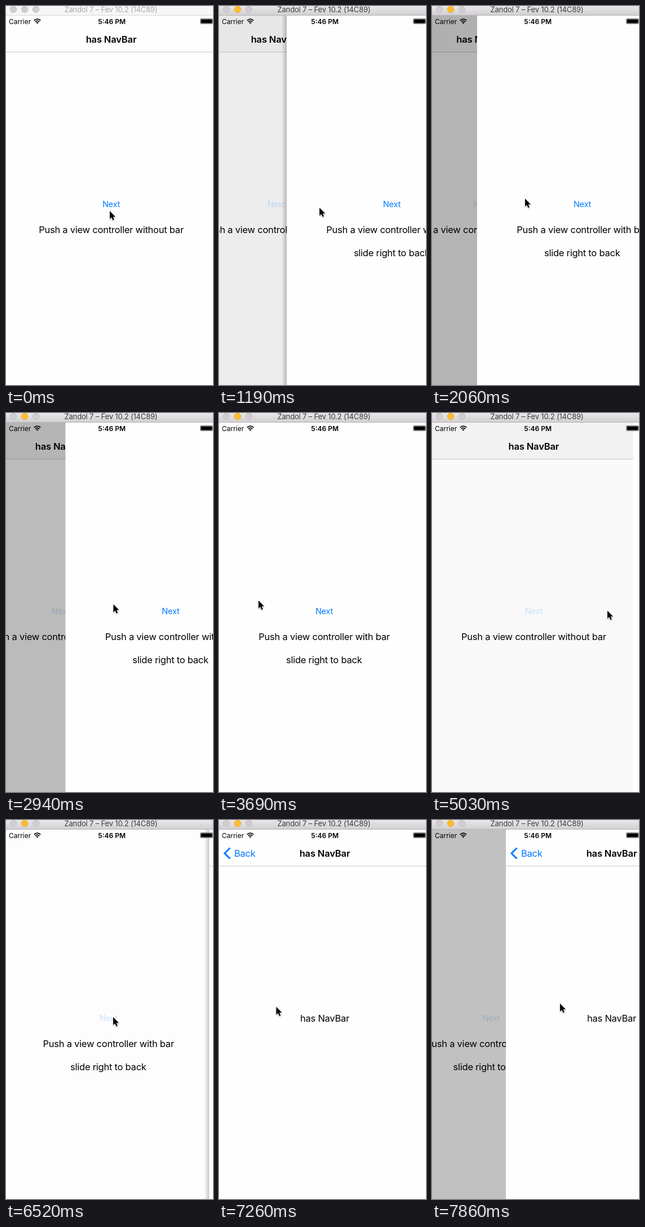
Animation, 367 px wide and 671 px high, one loop 8 s. Source, as an HTML page:

```html
<!DOCTYPE html>
<html lang="en">
<head>
<meta charset="utf-8">
<title>Navigation bar demo</title>
<style>
  html, body { margin: 0; width: 100%; height: 100%; overflow: hidden; background: #fefefe; }
  svg { display: block; width: 367px; height: 671px; }
  text { font: 400 16.5px Inter, "Open Sans", sans-serif; letter-spacing: -.24px; }
  .mid { text-anchor: middle; }
  .bold { font-weight: 600; letter-spacing: -.15px; }
  .next { font-size: 14.5px; letter-spacing: -.2px; fill: #007aff; }
  .status { font-size: 12px; letter-spacing: 0; }
  .caption { font-size: 13px; letter-spacing: -.17px; }
</style>
</head>
<body>
<svg viewBox="0 0 367 671">
  <defs>
    <linearGradient id="chrome" x2="0" y2="1">
      <stop stop-color="#e9e7e9"/><stop offset="1" stop-color="#d1cfd1"/>
    </linearGradient>
    <linearGradient id="edge">
      <stop stop-color="#000" stop-opacity="0"/><stop offset="1" stop-color="#000" stop-opacity=".22"/>
    </linearGradient>
    <filter id="soft" x="-50%" y="-50%" width="200%" height="200%">
      <feDropShadow dx="0" dy="1" stdDeviation="1" flood-opacity=".4"/>
    </filter>
  </defs>

  <g id="pages">
    <g id="root">
      <rect y="17" width="375" height="654" fill="#fefefe"/>
      <rect class="bar" y="17" width="375" height="64"/>
      <rect y="81" width="375" height="1" fill="#c8c8c8"/>
      <text class="mid bold" x="186.5" y="65">has NavBar</text>
      <text class="mid next" x="186.5" y="356">Next</text>
      <text class="mid" x="186.5" y="401.5">Push a view controller without bar</text>
    </g>
    <g id="plain">
      <rect y="17" width="375" height="654" fill="#fefefe"/>
      <text class="mid next" x="186.5" y="356">Next</text>
      <text class="mid" x="186.5" y="402">Push a view controller with bar</text>
      <text class="mid" x="186.2" y="442.5">slide right to back</text>
    </g>
    <g id="child">
      <rect y="17" width="375" height="654" fill="#fefefe"/>
      <rect y="81" width="375" height="1" fill="#c8c8c8"/>
      <path d="M19.5 49.5L10 59l9.500 9.500" fill="none" stroke="#007aff" stroke-width="3"/>
      <text x="27" y="65" fill="#007aff">Back</text>
      <text class="mid bold" x="187.500" y="65">has NavBar</text>
      <text class="mid" x="187.500" y="357">has NavBar</text>
    </g>
    <rect id="dim" y="17" width="367" height="654"/>
    <rect id="shade" y="17" width="9" height="654" fill="url(#edge)"/>
  </g>

  <text class="status" x="5" y="31.500">Carrier</text>
  <g fill="none" stroke="#000" stroke-width="1.700">
    <path d="M49.700 25.600Q55.500 20.600 61.300 25.600M51.700 28Q55.500 24.800 59.300 28"/>
    <path d="M53.400 29.300Q55.500 27.700 57.600 29.300L55.500 31.700Z" fill="#000" stroke="none"/>
  </g>
  <text class="status mid bold" x="187.700" y="31.500" style="letter-spacing:0">5:46 PM</text>
  <rect x="344.500" y="22.500" width="22" height="9" rx="1" fill="#fff" stroke="#777"/>
  <rect x="345.500" y="23.500" width="20" height="7"/>

  <rect id="top" width="367" height="16"/>
  <rect id="rim" y="16" width="367" height="1"/>
  <g fill="#d0ced0" stroke="#bab8ba" stroke-width=".8">
    <circle cx="13" cy="6" r="5.700"/><circle id="lamp" cx="33" cy="6" r="5.700"/><circle cx="53" cy="6" r="5.700"/>
  </g>
  <text id="caption" class="caption mid" x="186" y="11">Zandol 7 – Fev 10.2 (14C89)</text>

  <path id="cursor" d="M0 0V14L3.200 11.100L5.500 16.200L7.800 15.200L5.600 10.200H10Z" stroke="#fff" stroke-width="1" paint-order="stroke" filter="url(#soft)"/>
</svg>
<script>
const $ = id => document.getElementById(id);
const set = (el, attrs) => { for (const k in attrs) el.setAttribute(k, attrs[k]); };
const LOOP = 8000, W = 375;

// Runs of screen updates: first time, last time, intervals
const RUNS = [[0, 0, 1], [450, 750, 2], [1040, 2060, 7], [2210, 3240, 7], [3390, 4290, 6],
  [4440, 5470, 7], [5620, 6520, 6], [6670, 7710, 7], [7860, 7860, 1]];

// Pointer path: time, x, y
const PATH = [[0, 184, 363], [1040, 184, 363], [1190, 178, 357], [1480, 135, 346], [1700, 85, 342],
  [2060, 165, 341], [2500, 270, 340], [2950, 150, 338], [3240, 90, 335], [3540, 72, 333],
  [3690, 70, 332], [4140, 210, 330], [4440, 108, 328], [4587, 86, 328], [4880, 270, 342],
  [5028, 311, 350], [5180, 317, 354], [5470, 205, 352], [5620, 189, 350], [6520, 190, 349],
  [6820, 170, 340], [7300, 96, 330], [7860, 227, 325], [8000, 255, 326]];

function snap(t) {
  const [a, b, n] = RUNS.findLast(r => r[0] <= t + 1);
  const step = (b - a) / n;
  return step ? a + Math.min(n, Math.floor((t - a + 4) / step)) * step : a;
}

function pointer(t) {
  const i = Math.max(1, PATH.findIndex(p => p[0] >= t));
  const [t0, x0, y0] = PATH[i - 1], [t1, x1, y1] = PATH[i];
  const u = (t - t0) / (t1 - t0);
  return [x0 + (x1 - x0) * u, y0 + (y1 - y0) * u];
}

// Left edge of a pushed page, settling like a damped spring
function push(t, start) {
  const k = Math.max(0, t - start) * .014;
  const x = W * (1 + k) * Math.exp(-k);
  return x < 1 ? 0 : x;
}

const drag = (x, from) => Math.max(0, x - from);
const release = t => Math.min(W, 185 + (t - 4880) * 171 / 148);

function scene(t, px) {
  const s = (under, top, x, pushing = false) => ({ under, top, x, pushing });
  if (t < 1018) return s(null, 'root', 0);
  if (t < 1700) return s('root', 'plain', push(t, 1018), true);
  if (t < 3690) return s('root', 'plain', drag(px, 85));
  if (t < 4880) return s('root', 'plain', drag(px, 86.5));
  if (t < 5100) return s('root', 'plain', release(t));
  if (t < 5700) return s(null, 'root', 0);
  if (t < 6498) return s('root', 'plain', push(t, 5700), true);
  if (t < 7300) return s('plain', 'child', push(t, 6498), true);
  return s('plain', 'child', drag(px, 96));
}

const pressed = (id, t) => id === 'root'
  ? (t >= 750 && t < 1040) || (t >= 5620 && t < 5700)
  : id === 'plain' && t >= 6360 && t < 6498;

function draw(t) {
  const [px, py] = pointer(t);
  const { under, top, x, pushing } = scene(t, px);
  const left = 1 - x / W;
  for (const id of ['root', 'plain', 'child']) {
    const page = $(id), next = page.querySelector('.next');
    page.style.display = id === under || id === top ? '' : 'none';
    if (next) next.style.opacity = id === under || pressed(id, t) ? .2 : 1;
  }
  document.querySelector('.bar').setAttribute('fill', under === 'root' ? '#f7f7f7' : '#fefefe');
  if (under) set($(under), { transform: `translate(${-125 * left})` });
  set($(top), { transform: `translate(${x})` });
  set($('dim'), { opacity: under ? left * (pushing ? .1 : .37) : 0 });
  set($('shade'), { x: x - 9, opacity: pushing && x > 0 ? 1 : 0 });
  $('pages').append($('dim'), $('shade'), $(top));

  const active = t >= 450;
  set($('top'), { fill: active ? 'url(#chrome)' : '#f6f6f6' });
  set($('rim'), { fill: active ? '#b6b4b6' : '#d8d8d8' });
  set($('lamp'), { fill: active ? '#ffbd2e' : '#d0ced0', stroke: active ? '#e0a028' : '#bab8ba' });
  set($('caption'), { fill: active ? '#3c3c3c' : '#a9a9a9' });
  set($('cursor'), { transform: `translate(${px} ${py})` });
}

function tick() {
  draw(snap(performance.now() % LOOP));
  requestAnimationFrame(tick);
}
tick();
</script>
</body>
</html>
```
